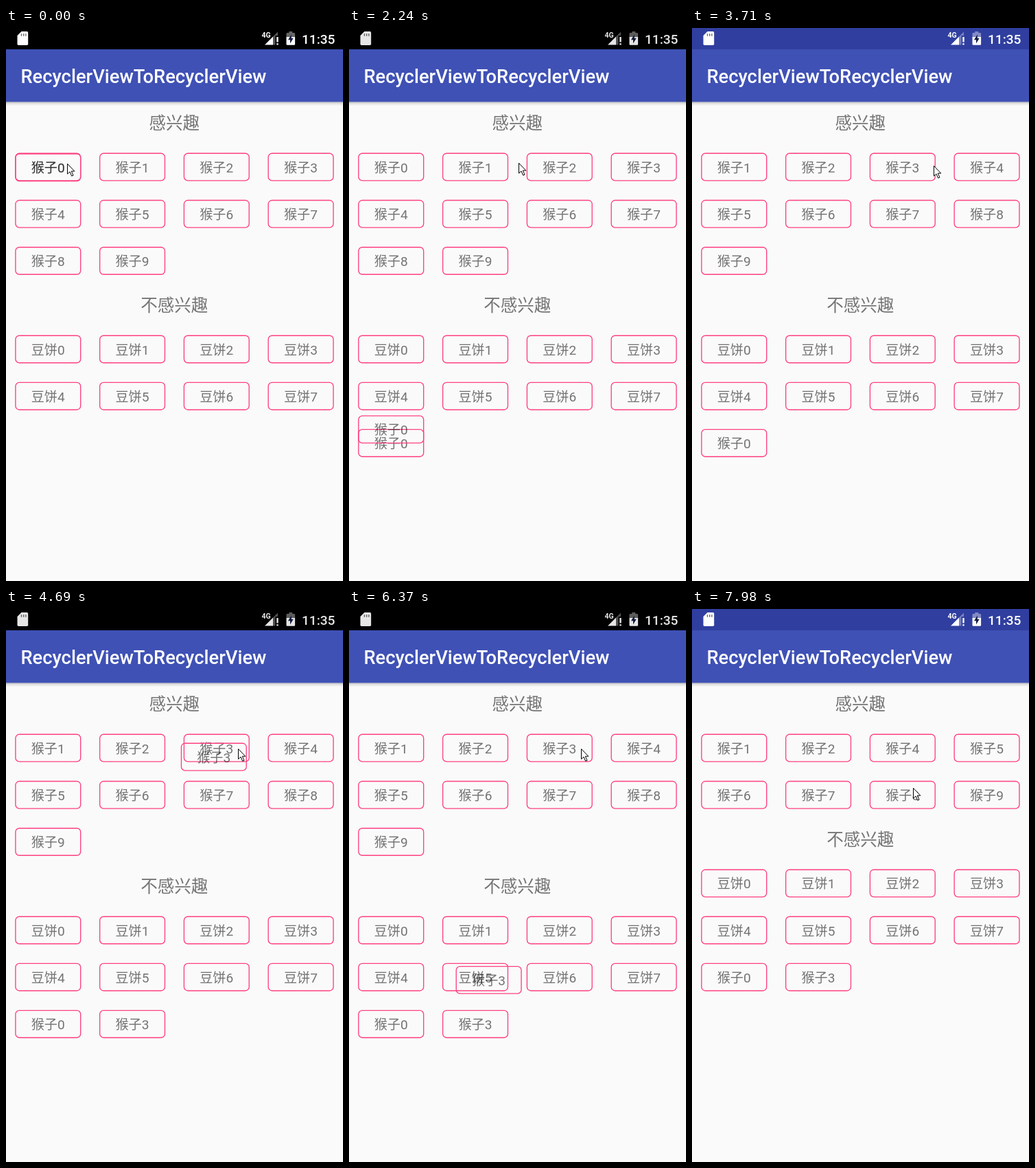
An HTML page that plays this animation: 491 px wide and 804 px high, repeating every 8 s.

```html
<!DOCTYPE html>
<html lang="zh-CN">
<head>
<meta charset="utf-8">
<style>
  html, body { margin: 0; width: 491px; height: 804px; overflow: hidden; background: #fafafa; }
  svg { display: block; font-family: Roboto, "Noto Sans CJK SC", "Noto Sans CJK", sans-serif; }
  .chip rect { fill: none; stroke: #ff4081; stroke-width: 1.36; }
  .chip text { font-size: 19.1px; text-anchor: middle; fill: #000; fill-opacity: .54; }
  .head { font-size: 24.5px; text-anchor: middle; fill: #757575; }
  .bold { font-weight: 500; fill: #fff; }
</style>
</head>
<body>
<svg width="491" height="804" viewBox="0 0 491 804">
  <defs>
    <linearGradient id="shade" x2="0" y2="1">
      <stop stop-color="#000" stop-opacity=".28"/>
      <stop offset=".4" stop-color="#000" stop-opacity=".1"/>
      <stop offset="1" stop-color="#000" stop-opacity="0"/>
    </linearGradient>
    <clipPath id="clip"><rect id="clipBox" y="168.3" width="491" height="204.6"/></clipPath>
  </defs>
  <rect width="491" height="804" fill="#fafafa"/>
  <rect y="107.3" width="491" height="6" fill="url(#shade)"/>
  <rect y="31" width="491" height="76.4" fill="#3f51b5"/>
  <rect id="bar" width="491" height="31"/>
  <g id="icons" fill="#fff">
    <path d="M22.5 5H30.5a1.7 1.7 0 0 1 1.7 1.7V23.3a1.7 1.7 0 0 1-1.7 1.7H18.2a1.7 1.7 0 0 1-1.7-1.7V11z"/>
    <path d="M22.5 8.2v3.6M25.7 8.2v3.6M28.9 8.2v3.6" stroke="#000" stroke-opacity=".6" stroke-width="1.4"/>
    <text x="372.5" y="14" font-size="10.5" font-weight="700">4G</text>
    <path d="M389 12.5L396 5.5V11H392.5V24.5H389z" opacity=".35"/>
    <path d="M377 24.5L389 12.5V24.5zM394.3 13h2.4v7.5h-2.4zM394.3 22.2h2.4v2.4h-2.4z"/>
    <path d="M408.5 13V8.2a1.2 1.2 0 0 1 1.2-1.2H412.3V5H417.3V7H419.9a1.2 1.2 0 0 1 1.2 1.2V13z" opacity=".4"/>
    <path d="M408.5 13H421.1V23.6a1.2 1.2 0 0 1-1.2 1.2H409.7a1.2 1.2 0 0 1-1.2-1.2z"/>
    <path d="M415.8 9.5L411 17.3H414V22.5L418.7 14.7H415.8z" fill="#111a40"/>
    <text class="bold" x="431" y="22.5" font-size="19.1">11:35</text>
  </g>
  <text class="bold" x="21.5" y="80" font-size="27.3">RecyclerViewToRecyclerView</text>
  <text class="head" x="245.3" y="147.3">感兴趣</text>
  <g clip-path="url(#clip)"><g id="top"></g></g>
  <g id="bottom"><text class="head" x="245.3" y="412.3">不感兴趣</text></g>
  <g id="fly"></g>
  <path id="cursor" d="M.5 .5V15.2L4 12 6.7 18.2 9 17.2 6.3 11.2H10.8z" fill="#fff" stroke="#000"/>
</svg>
<script>
const $ = id => document.getElementById(id);
const LOOP = 8000, ROW = 68.2, COL = 122.75, LIST_GAP = 264.9;
const FLY = 2695, FADE = 160, MOVE = 340;

// Each trip copies a chip to the lower list, then removes it from the upper one.
const trips = [
  { item: 0, from: 0, to: 8, show: -110, fly: -70, add: 30, end: 2880 },
  { item: 3, from: 2, to: 9, show: 4330, fly: 4381, add: 4480, end: 7430 }
];
const cursorKeys = [
  [0, 89, 197], [1410, 89, 197], [1680, 254, 193], [1900, 247, 196], [3100, 247, 196],
  [3700, 352, 200], [3920, 338, 203], [7500, 338, 203], [7960, 322, 260], [LOOP, 322, 260]
];

const ramp = (t, start, time) => Math.min(1, Math.max(0, (t - start) / time));
const smooth = u => (1 - Math.cos(Math.PI * u)) / 2;
const mix = (a, b, p) => a.map((v, i) => v + (b[i] - v) * p);
const slot = i => [i % 4 * COL, Math.floor(i / 4) * ROW];
const place = (el, [x, y]) => el.setAttribute("transform", `translate(${x} ${y})`);

function chip(parent, label, y = 0) {
  parent.insertAdjacentHTML("beforeend", `<g class="chip">
    <rect x="13.9" y="${182.3 + y}" width="94.8" height="39.6" rx="5.5"/>
    <text x="61.2" y="${209.7 + y}">${label}</text></g>`);
  return parent.lastElementChild;
}

const upper = Array.from({ length: 10 }, (_, i) => chip($("top"), "猴子" + i));
const lower = Array.from({ length: 10 }, (_, i) => {
  const el = chip($("bottom"), i < 8 ? "豆饼" + i : "猴子" + trips[i - 8].item, LIST_GAP);
  place(el, slot(i));
  return el;
});
for (const trip of trips) trip.copy = chip($("fly"), "猴子" + trip.item);

function draw(t) {
  const moves = trips.map(trip => smooth(ramp(t, trip.end + FADE + 40, MOVE)));
  upper.forEach((el, i) => {
    let pos = slot(i), index = i;
    trips.forEach((trip, k) => {
      if (i <= trip.item) return;
      const next = slot(index - 1), here = slot(index--);
      pos = pos.map((v, a) => v + (next[a] - here[a]) * moves[k]);
    });
    place(el, pos);
  });

  let tint = 0, flying = false;
  for (const trip of trips) {
    upper[trip.item].setAttribute("opacity", 1 - ramp(t, trip.end, FADE));
    lower[trip.to].setAttribute("opacity", ramp(t, trip.add, FADE));
    const active = t >= trip.show && t < trip.end;
    const [x, y] = slot(trip.to);
    trip.copy.setAttribute("visibility", active ? "visible" : "hidden");
    place(trip.copy, mix(slot(trip.from), [x, y + LIST_GAP], smooth(ramp(t, trip.fly, FLY))));
    flying ||= active;
    if (t >= trip.end) tint = 1 - (1 - ramp(t, trip.end, 500)) ** 3;
  }
  if (flying) tint = 0;
  $("bar").setAttribute("fill", `rgb(${[48, 63, 159].map(c => Math.round(c * tint))})`);
  $("icons").setAttribute("opacity", flying && t >= 70 ? .9 : 1);

  // The upper list loses its third row at once.
  const short = t >= trips[1].end;
  $("clipBox").setAttribute("height", (short ? 2 : 3) * ROW);
  place($("bottom"), [0, short ? -ROW : 0]);

  const k = cursorKeys.findIndex(key => key[0] > t);
  const [a, b] = [cursorKeys[k - 1], cursorKeys[k]];
  place($("cursor"), mix(a, b, smooth(ramp(t, a[0], b[0] - a[0]))).slice(1));
}

function tick() {
  draw(performance.now() % LOOP);
  requestAnimationFrame(tick);
}
tick();
</script>
</body>
</html>
```
